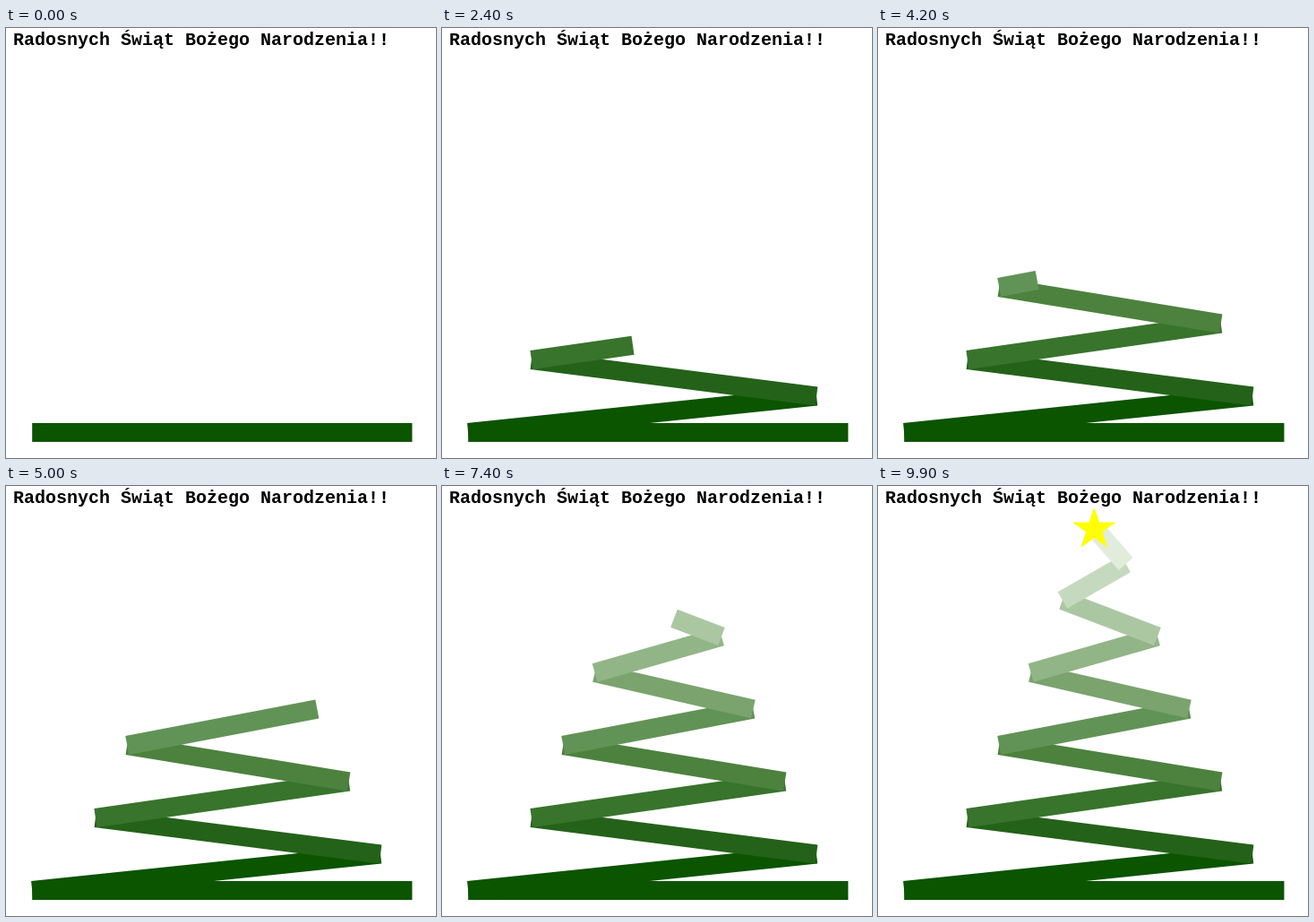
An HTML page that plays this animation: 480 px wide and 480 px high, repeating every 10000 ms.

```html
<!DOCTYPE html>
<html lang="pl">
<head>
<meta charset="utf-8">
<title>Choinka</title>
<style>
  html, body { margin: 0; width: 100%; height: 100%; overflow: hidden; background: #fff; }
  svg { display: block; width: 480px; height: 480px; }
  text { font: bold 20px "Courier New", "Liberation Mono", monospace; white-space: pre; }
  line { stroke-width: 21.2; }
</style>
</head>
<body>
<svg viewBox="0 0 480 480">
  <defs><clipPath id="panel"><rect y="26" width="480" height="454"/></clipPath></defs>
  <text x="8" y="18.5">Radosnych Świąt Bożego Narodzenia!!</text>
  <g id="tree"></g>
  <g clip-path="url(#panel)"><polygon id="star" fill="#ff0"/></g>
</svg>
<script>
const FRAME_MS = 100, FRAMES = 100;
const CENTER = 241.3, BASE = 451.5, STEP_X = 35.35, STEP_Y = 40.5;
const greens = ['#0b5400', '#246219', '#38742c', '#4c823e', '#629356',
                '#7aa36d', '#92b587', '#abc7a2', '#c5d9bf', '#e1ecdd'];
const tree = document.getElementById('tree');
const star = document.getElementById('star');

// Zigzag corners, alternating left and right while narrowing upwards.
const corner = i => {
  const reach = i === 0 ? 6 : Math.floor((11 - i) / 2);
  return { x: CENTER + (i % 2 ? 1 : -1) * reach * STEP_X, y: BASE - i * STEP_Y };
};

// 99 steps over ten ribbons: the sixth is one step shorter.
const startFrame = i => 10 * i - (i >= 6 ? 1 : 0);

function addLine(a, b, color) {
  const line = document.createElementNS('http://www.w3.org/2000/svg', 'line');
  const attrs = { x1: a.x, y1: a.y, x2: b.x, y2: b.y, stroke: color };
  for (const name in attrs) line.setAttribute(name, attrs[name]);
  tree.append(line);
  return line;
}

function starPoints(cx, cy, radius) {
  return Array.from({ length: 10 }, (_, i) => {
    const r = i % 2 ? radius * 0.382 : radius;
    const a = (i * 36 - 90) * Math.PI / 180;
    return `${cx + r * Math.cos(a)},${cy + r * Math.sin(a)}`;
  }).join(' ');
}

const left = corner(0);
addLine({ x: 2 * CENTER - left.x, y: BASE }, left, greens[0]);
const ribbons = greens.map((color, i) => addLine(corner(i), corner(i), color));
star.setAttribute('points', starPoints(CENTER, 48.3, 25.6));

function draw(frame) {
  ribbons.forEach((line, i) => {
    const from = startFrame(i), to = startFrame(i + 1);
    const part = Math.min(1, Math.max(0, (frame - from) / (to - from)));
    const a = corner(i), b = corner(i + 1);
    line.setAttribute('x2', a.x + (b.x - a.x) * part);
    line.setAttribute('y2', a.y + (b.y - a.y) * part);
    line.style.display = part > 0 ? '' : 'none';
  });
  star.style.display = frame === FRAMES - 1 ? '' : 'none';
}

function tick() {
  draw(Math.floor(performance.now() / FRAME_MS) % FRAMES);
  requestAnimationFrame(tick);
}
tick();
</script>
</body>
</html>
```
